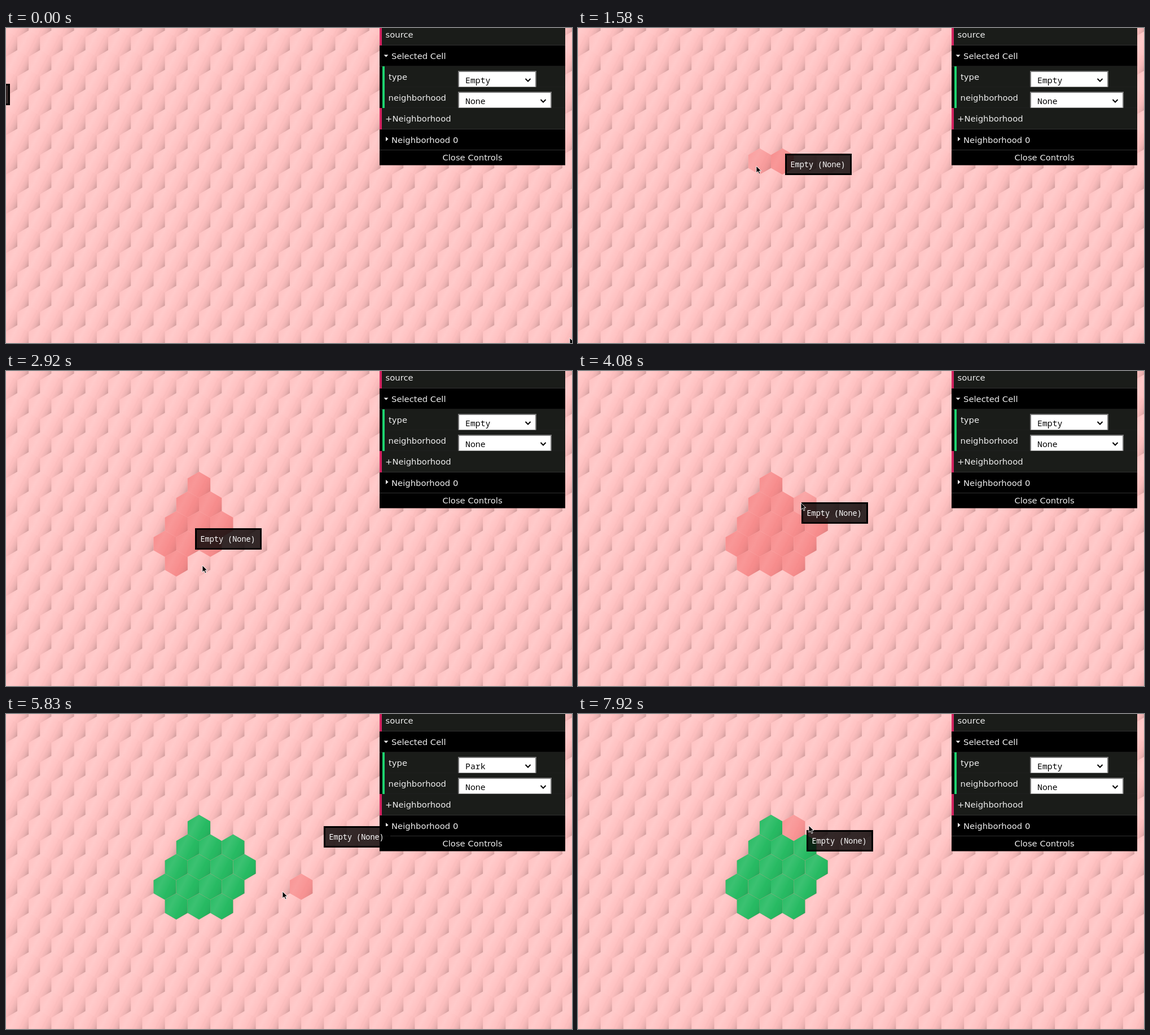
Animation, 1003 px wide and 559 px high, one loop 8000 ms. Source, as an HTML page:

```html
<!DOCTYPE html>
<html lang="en">
<head>
<meta charset="utf-8">
<title>Hex map editor</title>
<style>
html, body { margin: 0; width: 100%; height: 100%; overflow: hidden; background: #ffc2c2; }
svg { display: block; width: 100%; height: 100%; }
text { white-space: pre; }
.ui { font: 14.8px "DejaVu Sans", sans-serif; fill: #eee; }
.mono { font: 300 14.8px "Noto Sans Mono", monospace; fill: #000; }
.tip { font: 400 13.5px "Noto Sans Mono", monospace; fill: #fff; }
</style>
</head>
<body>
<svg viewBox="0 0 1003 559">
  <defs>
    <linearGradient id="shade" gradientUnits="userSpaceOnUse" x1="-20" y1="-10" x2="21" y2="10.5">
      <stop offset="0" stop-color="#fff" stop-opacity=".05"/>
      <stop offset=".3" stop-color="#fff" stop-opacity=".17"/>
      <stop offset=".58" stop-color="#fff" stop-opacity=".04"/>
      <stop offset=".68" stop-color="#000" stop-opacity=".01"/>
      <stop offset=".84" stop-color="#000" stop-opacity=".07"/>
      <stop offset="1" stop-color="#000" stop-opacity=".19"/>
    </linearGradient>
    <polygon id="hex"/>
    <clipPath id="typeRow"><rect x="667" y="68" width="324" height="36.5"/></clipPath>
    <clipPath id="hoodRow"><rect x="667" y="105" width="324" height="36.5"/></clipPath>
  </defs>
  <rect width="1003" height="559" fill="#ffc0c0"/>
  <g id="grid"></g>
  <g id="cells"></g>
  <g id="panel"></g>
  <g id="tip">
    <rect x="1.5" y="1.5" width="115" height="35" fill="#000" fill-opacity=".8" stroke="#000" stroke-width="3"/>
    <text class="tip" x="9.5" y="23.5">Empty (None)</text>
  </g>
  <g id="menu"></g>
  <path id="cursor" d="M0 0V12L3 9.5 5 14 7 13 5 8.8H8.8Z" fill="#000" stroke="#fff" stroke-width=".9"/>
</svg>
<script>
const LOOP = 8000, STEPS_PER_MS = 0.012;
const PITCH_X = 40.25, PITCH_Y = 34.85;
const RED = "#f88d8d", GREEN = "#27bb63";
const $ = id => document.getElementById(id);
const clamp = (v, lo = 0, hi = 1) => Math.min(hi, Math.max(lo, v));
const mix = (a, b, k) => a.map((v, i) => v + (b[i] - v) * k);

function add(parent, tag, attrs, text) {
  const el = document.createElementNS("http://www.w3.org/2000/svg", tag);
  for (const key in attrs) el.setAttribute(key, attrs[key]);
  if (text) el.textContent = text;
  parent.appendChild(el);
  return el;
}
const rect = (parent, x, y, width, height, fill, more) =>
  add(parent, "rect", { x, y, width, height, fill, ...more });
const label = (parent, cls, x, y, text, more) =>
  add(parent, "text", { class: cls, x, y, ...more }, text);
const show = (el, on) => el.setAttribute("visibility", on ? "visible" : "hidden");
const move = (el, [x, y]) => el.setAttribute("transform", `translate(${x} ${y})`);

// Pointer path: step, x, y
const pointer = [
  [0, 999, 550], [6, 560, 330], [10, 362, 262], [13, 362, 225], [16, 347, 205], [19, 316, 245],
  [22, 338, 205], [24, 380, 262], [26, 362, 302], [28, 325, 285], [30, 298, 345], [31, 282, 310],
  [32, 315, 261], [35, 348, 345], [36, 385, 342], [38, 422, 270], [39, 520, 95], [41, 440, 270],
  [44, 320, 305], [46, 376, 215], [49, 395, 234], [52, 543, 181], [55, 900, 88], [59, 860, 178],
  [62, 862, 180], [67, 620, 260], [70, 490, 315], [76, 401, 176], [78, 412, 195], [79, 400, 194],
  [81, 385, 190], [84, 532, 100], [86, 532, 100], [89, 430, 265], [92, 385, 188], [95, 409, 198]
];
const LEAVE = 52, OPEN = 57, PICK = 61, BACK = 67, RESET = 89;

function pointerAt(s) {
  let i = 1;
  while (i < pointer.length - 1 && pointer[i][0] < s) i++;
  const [s0, ...a] = pointer[i - 1], [s1, ...b] = pointer[i];
  return mix(a, b, clamp((s - s0) / (s1 - s0)));
}

// The map does not see the pointer while it is over the panel
const seenAt = s => pointerAt(s > LEAVE && s <= BACK ? LEAVE : s);

function tipAt(s) {
  const [x, y] = seenAt(s - 3);
  return mix([-111, 99], [x + 20, y + 18], clamp(s / 8));
}

// Hex grid
const center = (q, r) => [342 + q * PITCH_X - (r & 1) * PITCH_X / 2, 202 + r * PITCH_Y];

function cellAt([x, y]) {
  const near = Math.round((y - 202) / PITCH_Y);
  let best = null, min = Infinity;
  for (let r = near - 1; r <= near + 1; r++) {
    const q = Math.round((x - center(0, r)[0]) / PITCH_X);
    const [cx, cy] = center(q, r);
    const d = Math.hypot(x - cx, y - cy);
    if (d < min) { min = d; best = [q, r]; }
  }
  return best;
}

$("hex").setAttribute("points", Array.from({ length: 6 }, (_, i) => {
  const a = i * Math.PI / 3, radius = PITCH_Y / 1.5;
  return [Math.sin(a) * radius, -Math.cos(a) * radius];
}).join(" "));

for (let r = -6; r <= 11; r++)
  for (let q = -9; q <= 17; q++)
    move(add($("grid"), "use", { href: "#hex", fill: "url(#shade)" }), center(q, r));

function makeCell(pos, ...fills) {
  const g = add($("cells"), "g");
  move(g, pos);
  const layers = fills.map(fill => add(g, "use", { href: "#hex", fill }));
  add(g, "use", { href: "#hex", fill: "url(#shade)", opacity: .55 });
  return { g, layers };
}

// First step at which the pointer drags across a cell
function paintStep(q, r) {
  for (let s = r === 1 ? 11 : 20; s < LEAVE; s++) {
    const [cq, cr] = cellAt(pointerAt(s));
    if (cq === q && cr === r) return s;
  }
  return 37;
}

// First column and number of cells, row by row
const painted = [[0, 1], [0, 3], [-1, 4], [-1, 4], [-1, 3]].flatMap(([first, count], r) =>
  Array.from({ length: count }, (_, i) => {
    const q = first + i;
    return { q, r, start: paintStep(q, r), ...makeCell(center(q, r), RED, GREEN, "#fff") };
  }));
const hover = makeCell([0, 0], "#f99494");

// Control panel
const panel = $("panel");
const ROW = "#1a1c19", LINE = "#303030", PINK = "#d32360", MINT = "#1ed36f";
rect(panel, 662, 0, 329, 243.5, "#000");

function row(y, h, fill, edge, inset = 0) {
  rect(panel, 662 + inset, y, 329 - inset, h, fill);
  rect(panel, 662 + inset, y + h, 329 - inset, 1, LINE);
  if (edge) rect(panel, 662 + inset, y, 4, h + 1, edge);
}
row(0, 30, ROW, PINK);
row(31, 36.5, "#000");
row(68, 36.5, ROW, MINT, 5);
row(105, 36.5, ROW, MINT, 5);
row(142, 37, ROW, PINK);
row(180, 36, "#000");

label(panel, "ui", 672.5, 17, "source");
label(panel, "ui", 683, 54.5, "Selected Cell");
label(panel, "ui", 678, 91.5, "type");
label(panel, "ui", 677.5, 129, "neighborhood");
label(panel, "ui", 672, 166, "+Neighborhood");
label(panel, "ui", 683, 203.5, "Neighborhood 0");
label(panel, "ui", 826.5, 235, "Close Controls", { "text-anchor": "middle" });
add(panel, "path", { d: "M669.5 47.5h8l-4 4zM673 193l4.5 4-4.5 4z", fill: "#eee" });

function select(y, width, clip, value) {
  const g = add(panel, "g", { "clip-path": `url(#${clip})` });
  rect(g, 802, y + 1, width - 2, 34, "#fff", { stroke: "#767676", "stroke-width": 2 });
  add(g, "path", {
    d: `M${781.5 + width} ${y + 14}l4.5 4.5 4.5-4.5`,
    fill: "none", stroke: "#000", "stroke-width": 2
  });
  return { g, text: label(g, "mono", 814, y + 21.5, value) };
}
const type = select(76, 139, "typeRow", "Empty");
select(113, 166, "hoodRow", "None");
const focus = rect(type.g, 805, 80, 131.5, 30, "none",
  { stroke: "#000", "stroke-width": 2, "stroke-dasharray": "4 2" });

// Drop-down list
const menu = $("menu"), ITEM = 27.7;
rect(menu, 799.5, 109.5, 140, 111, "#fff", { stroke: "#999" });
const items = ["Empty", "Residential", "Park", "River"].map((name, i) => ({
  back: rect(menu, 800, 110 + i * ITEM, 139, ITEM, "#000"),
  text: label(menu, "mono", 810, 129.3 + i * ITEM, name)
}));

function draw(ms) {
  const s = Math.floor(ms * STEPS_PER_MS + 0.06);
  const pos = pointerAt(s);
  move($("cursor"), pos);
  move($("tip"), tipAt(s));

  for (const { q, r, start, g, layers: [, green, glow] } of painted) {
    g.setAttribute("opacity", clamp((s - start) / 1.5));
    green.setAttribute("opacity", clamp((s - PICK) / 8));
    const lit = q === 2 && r === 1 ? clamp(1 - Math.abs(s - 78.5) / 4) : 0;
    glow.setAttribute("opacity", lit * 0.55);
  }

  const [q, r] = cellAt(seenAt(s - 1));
  const free = !painted.some(c => c.q === q && c.r === r && s >= c.start);
  show(hover.g, s > 1 && free);
  move(hover.g, center(q, r));

  type.text.textContent = s >= PICK && s < RESET ? "Park" : "Empty";
  show(focus, s >= 55 && s < BACK);
  show(menu, s >= OPEN && s < PICK);
  const active = clamp(Math.floor((pos[1] - 110) / ITEM), 0, 3);
  items.forEach(({ back, text }, i) => {
    back.setAttribute("fill", i === active ? "#000" : "#fff");
    text.style.fill = i === active ? "#fff" : "#000";
  });
}

function tick() {
  draw(performance.now() % LOOP);
  requestAnimationFrame(tick);
}
tick();
</script>
</body>
</html>
```
